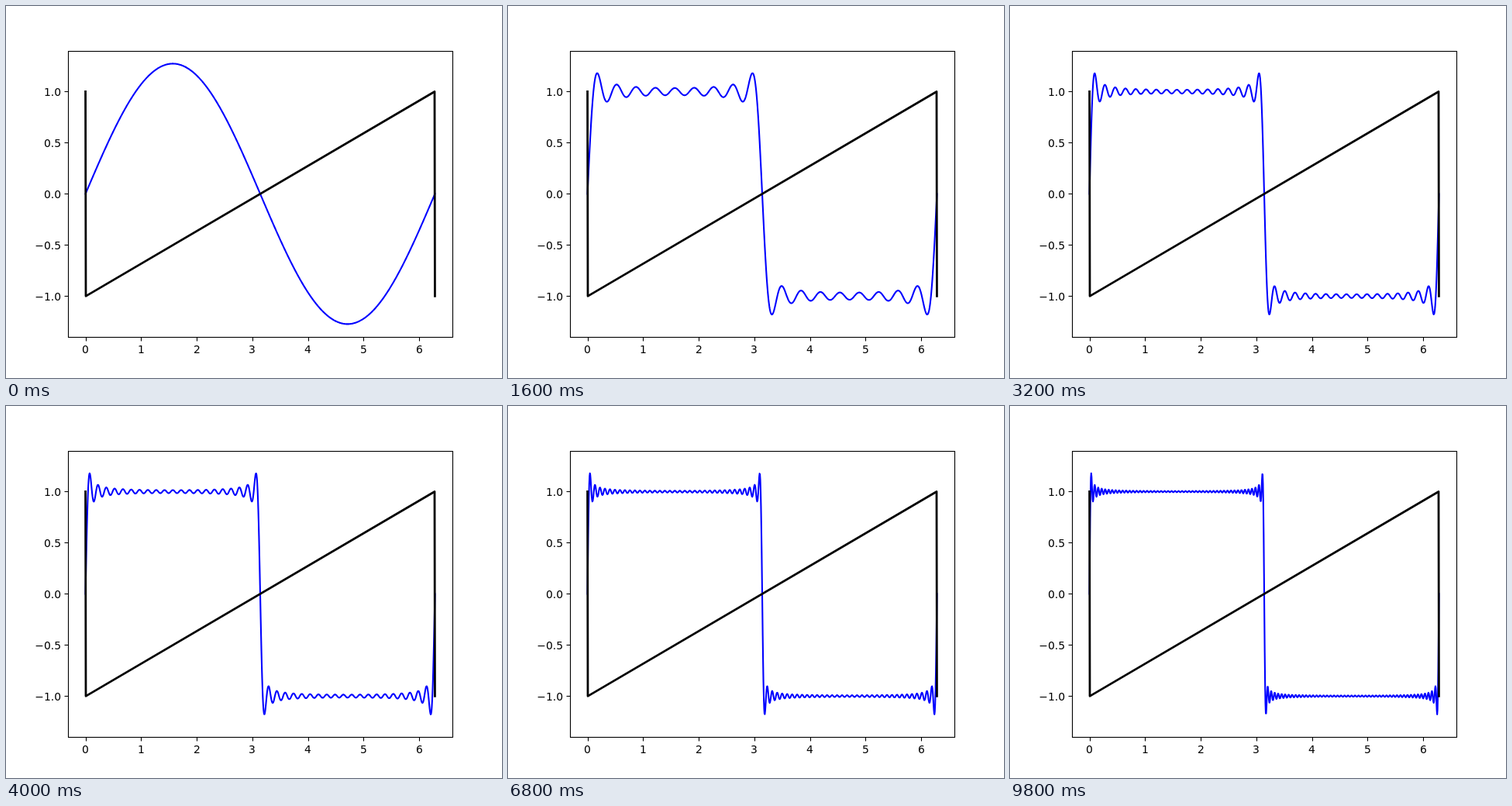
Recreate the animation shown at these times as an HTML page with a canvas. Size 640 by 480 pixels, loop 10000 ms.

```html
<!DOCTYPE html>
<html lang="en">
<head>
<meta charset="utf-8">
<title>Fourier series of a square wave</title>
<style>
  html, body { margin: 0; width: 100%; height: 100%; overflow: hidden; background: #fff; }
  canvas { display: block; }
</style>
</head>
<body>
<canvas id="stage" width="640" height="480"></canvas>
<script>
const ctx = document.getElementById('stage').getContext('2d');

const LOOP = 10000, STEP = 200;
const SAMPLES = 1000, TAU = 2 * Math.PI;
const POINT = 100 / 72; // pixels per typographic point
const axes = { left: 80, right: 576, top: 57.6, bottom: 427.2 };

// The data fill the axes except for a 5 % margin on each side.
const unitX = (axes.right - axes.left) / (TAU * 1.1);
const unitY = (axes.bottom - axes.top) / (8 / Math.PI * 1.1);
const toX = x => (axes.left + axes.right) / 2 + (x - Math.PI) * unitX;
const toY = y => (axes.top + axes.bottom) / 2 - y * unitY;
const snap = v => Math.floor(v + 0.5) + 0.5;
const sampleX = i => TAU * i / (SAMPLES - 1);

function strokeLine(points, color, width, cap = 'square') {
  ctx.beginPath();
  for (const [x, y] of points) ctx.lineTo(x, y);
  ctx.strokeStyle = color;
  ctx.lineWidth = width * POINT;
  ctx.lineCap = cap;
  ctx.lineJoin = 'round';
  ctx.stroke();
}

function squareSeries(x, terms) {
  let sum = 0;
  for (let n = 1; n < 2 * terms; n += 2) sum += Math.sin(n * x) / n;
  return 4 / Math.PI * sum;
}

function drawSeries(terms) {
  const points = Array.from({ length: SAMPLES }, (_, i) => {
    const x = sampleX(i);
    return [toX(x), toY(squareSeries(x, terms))];
  });
  strokeLine(points, '#00f', 1.5);
}

function drawSawtooth() {
  const corners = [[0, 1], [1, -1], [SAMPLES - 2, 1], [SAMPLES - 1, -1]];
  strokeLine(corners.map(([i, y]) => [toX(sampleX(i)), toY(y)]), '#000', 2);
}

function drawAxes() {
  const left = snap(axes.left), right = snap(axes.right);
  const top = snap(axes.top), bottom = snap(axes.bottom);
  ctx.lineWidth = 0.8 * POINT;
  ctx.strokeStyle = ctx.fillStyle = '#000';
  ctx.lineJoin = 'miter';
  ctx.strokeRect(left, top, right - left, bottom - top);

  ctx.font = `${10 * POINT}px "DejaVu Sans", sans-serif`;
  ctx.textAlign = 'left';
  for (let value = 0; value <= 6; value++) {
    const x = snap(toX(value));
    strokeLine([[x, bottom], [x, bottom + 5]], '#000', 0.8, 'butt');
    const half = ctx.measureText(value).width / 2;
    ctx.fillText(value, Math.round(toX(value) - half), 448);
  }
  ctx.textAlign = 'right';
  for (let value = -1; value <= 1; value += 0.5) {
    const y = snap(toY(value));
    strokeLine([[left, y], [left - 5, y]], '#000', 0.8, 'butt');
    const label = value.toFixed(1).replace('-', '\u2212');
    ctx.fillText(label, 71, Math.round(toY(value) + 5.3));
  }
}

function render() {
  const step = Math.floor(performance.now() % LOOP / STEP);
  ctx.fillStyle = '#fff';
  ctx.fillRect(0, 0, 640, 480);
  drawSeries(step + 1);
  drawSawtooth();
  drawAxes();
  requestAnimationFrame(render);
}
render();
</script>
</body>
</html>
```
